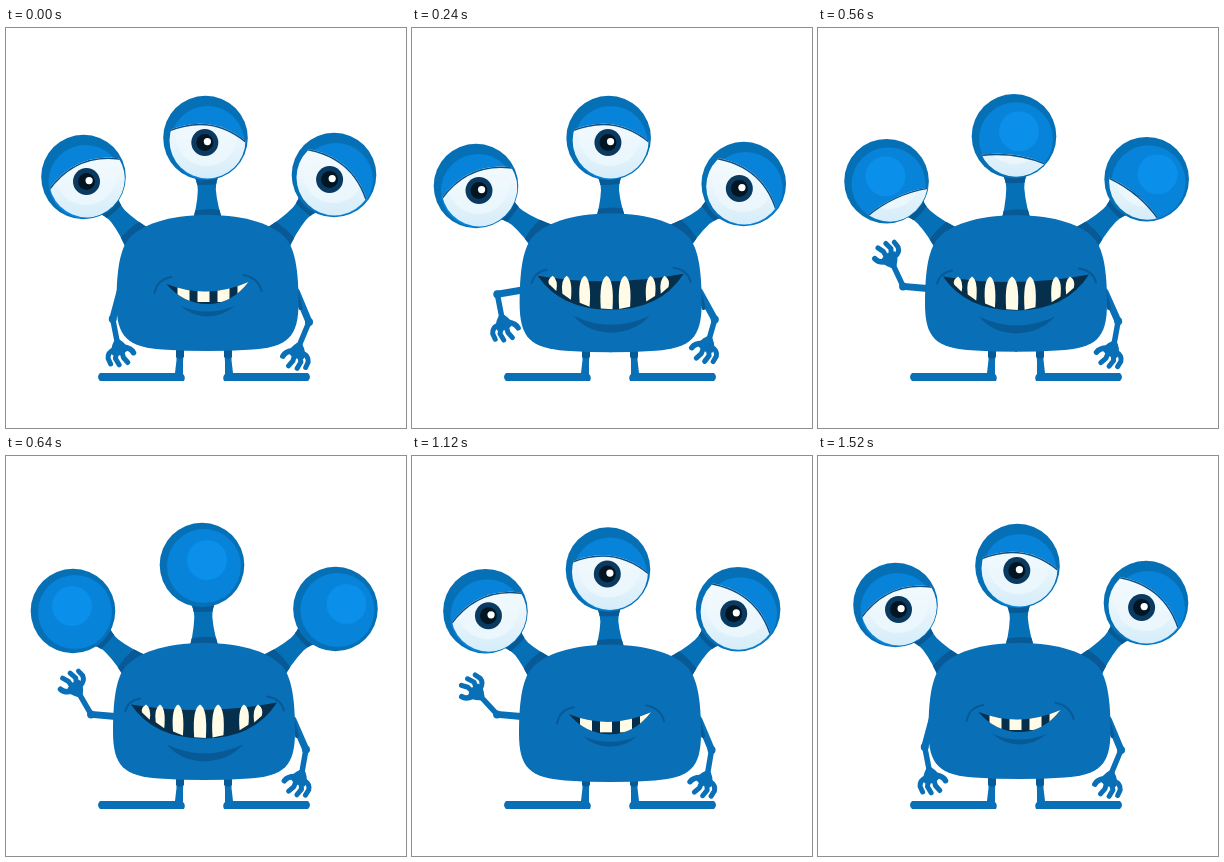
These frames come from a looping animation (400x400 px, 1600 ms). An HTML page with a canvas:

```html
<!DOCTYPE html>
<html lang="en">
<head>
<meta charset="utf-8">
<title>Waving monster</title>
<style>
html, body { margin: 0; width: 100%; height: 100%; overflow: hidden; background: #fff; }
canvas { display: block; width: 400px; height: 400px; }
</style>
</head>
<body>
<canvas id="stage"></canvas>
<script>
const LOOP = 1600, STEP = 80;
const C = {
  skin: '#096fb6', shade: '#085a97', ball: '#0670b6', lid: '#0783d9', shine: '#0a8fea',
  line: '#0a4f85', mouth: '#052f4b', tooth: '#fffbe6', iris: '#0a3a60', pupil: '#021523'
};

const canvas = document.getElementById('stage');
const g = canvas.getContext('2d');
const dpr = window.devicePixelRatio || 1;
canvas.width = canvas.height = 400 * dpr;

const rad = deg => deg * Math.PI / 180;
const polar = ([x, y], deg, len) => [x + len * Math.cos(rad(deg)), y + len * Math.sin(rad(deg))];
const mix = (a, b, u) => a + (b - a) * u;

function ease(t, from, to) {
  const u = Math.min(1, Math.max(0, (t - from) / (to - from)));
  return u * u * (3 - 2 * u);
}

// Eased walk through [time, value] points, starting at zero.
function track(t, points) {
  let from = 80, value = 0;
  for (const [to, next] of points) {
    value = mix(value, next, ease(t, from, to));
    from = to;
  }
  return value;
}

function poseAt(t) {
  const lift = ease(t, 80, 300) - ease(t, 1120, 1360);
  const raise = ease(t, 240, 400) - ease(t, 1070, 1360);
  const wave = 250 + 10 * Math.cos(2 * Math.PI * (t - 400) / 480);
  const droop = track(t, [[240, 1], [400, 0.33], [640, 0.78], [880, 0.33], [1120, 0.3], [1360, 0]]);
  const bob = track(t, [[240, 0], [400, -4], [640, -1], [880, -1.5], [1120, 3.5], [1360, 0]]);
  return {
    lift,
    fore: mix(79, wave, raise),
    recoil: 8 * lift * Math.exp((240 - t) / 200),
    shut: Math.max(0, 1 - Math.abs(t - 640) / 160),
    cx: 201.5 - 3.5 * lift,
    top: 187 + 3 * lift - 4 * droop,
    bottom: 323 + 1.5 * lift + 0.4 * bob,
    eyes: [
      [77.5 - 13.5 * droop, 149 + 9 * droop + bob],
      [199.5 - 3.5 * lift, 110 + bob],
      [328 - 4 * lift + 7 * droop, 147 + 9 * droop + bob]
    ]
  };
}

function fill(d, color) {
  g.fillStyle = color;
  g.fill(new Path2D(d));
}

function stroke(d, color, width) {
  g.strokeStyle = color;
  g.lineWidth = width;
  g.lineCap = g.lineJoin = 'round';
  g.stroke(new Path2D(d));
}

function disc(x, y, r, color) {
  g.fillStyle = color;
  g.beginPath();
  g.arc(x, y, r, 0, 2 * Math.PI);
  g.fill();
}

function at(x, y, deg, draw) {
  g.save();
  g.translate(x, y);
  g.rotate(rad(deg));
  draw();
  g.restore();
}

function hand([x, y], deg, flip) {
  at(x, y, deg, () => {
    g.scale(1, flip);
    fill('M-2 -3 Q4 -9 10 -8 Q15 0 11 8 Q4 9 -2 3Z', C.skin);
    stroke('M6 5 Q7 12 13 13 L19 12', C.skin, 5);
    stroke('M9 3 L15 6 L22 4 M9 -2 L16 -2 L22 -5', C.skin, 5);
    stroke('M6 -5 Q9 -12 14 -13', C.skin, 5.5);
  });
}

function arm(shoulder, elbow, wrist) {
  stroke(`M${shoulder} L${elbow}`, C.skin, 7);
  stroke(`M${elbow} L${wrist}`, C.skin, 5.5);
  disc(...elbow, 4, C.skin);
  disc(...wrist, 3.5, C.skin);
}

function leg(x, dir) {
  at(x, 0, 0, () => {
    g.scale(dir, 1);
    fill('M-4 318 H4 L3 334 V346 Q6 349 4 353 H-80 Q-84 349 -80 345 H-5 L-3.5 332Z', C.skin);
    fill('M-4 318 H4 V329 Q0 332 -4 329Z', C.shade);
  });
}

function stalk(bx, by, ex, ey) {
  const d = Math.hypot(ex - bx, ey - by);
  const neck = d - 38;
  at(bx, by, Math.atan2(ey - by, ex - bx) * 180 / Math.PI, () => {
    const shape = `M-10 -17 Q10 -10 ${neck - 14} -9 Q${neck - 5} -9 ${neck + 4} -14 V14 Q${neck - 5} 9 ${neck - 14} 9 Q10 10 -10 17Z`;
    fill(shape, C.ball);
    g.clip(new Path2D(shape));
    fill(`M${neck - 7} -20 Q${neck - 11} 0 ${neck - 7} 20 H${d} V-20Z`, C.shade);
    fill('M-10 -20 H5 Q11 0 5 20 H-10Z', C.shade);
  });
}

// side: -1 left, 0 middle, 1 right
function eye(x, y, side, shut) {
  const tilt = 7 + 32 * side;
  const wx = 2 - 1.5 * side, px = -0.7 - 3.7 * side;
  const ends = 2 + shut * 50, mid = -30 + shut * 80;
  const edge = `M-46 ${ends} Q2 ${mid} 46 ${ends}`;

  disc(x, y, 42.3, C.ball);
  at(x, y, 0, () => {
    g.beginPath();
    g.arc(0, 0, 41.5, 0, 2 * Math.PI);
    g.clip();
    disc(2, 5 - 4 * shut, 37, C.lid);
    if (shut > 0.3) disc(5 + 6 * side, -5, 20, C.shine);

    g.rotate(rad(tilt));
    g.clip(new Path2D(edge + ' V60 H-46Z'));
    g.rotate(rad(-tilt));
    const glow = g.createLinearGradient(0, -25, 0, 40);
    glow.addColorStop(0, '#f8fcff');
    glow.addColorStop(1, '#d6edf9');
    disc(wx, 2.5, 38, glow);
    disc(wx - 1, -3, 31, 'rgba(240,249,254,.7)');
    disc(px, 4.5, 13.5, C.iris);
    disc(px, 4.5, 8.5, C.pupil);
    disc(px + 2.6, 3.6, 3.6, '#fff');
    g.beginPath();
    g.arc(wx, 2.5, 38, 0, 2 * Math.PI);
    g.clip();
    g.rotate(rad(tilt));
    stroke(edge, C.line, 3);
  });
}

function body(x, top, bottom) {
  at(x, top, 0, () => {
    g.scale(1, (bottom - top) / 136);
    for (const dir of [1, -1]) {
      g.scale(dir, 1);
      fill('M-1 0 H0 C40 0 66 10 78 23 C89 35 91 62 91 88 C91 122 80 132 45 134.5 Q22 136 0 136 H-1Z', C.skin);
    }
  });
}

function smile(x, y) {
  at(x, y, 0, () => {
    g.save();
    g.clip(new Path2D('M-41 -9 Q0 7 41 -11 Q24 11 0 11 Q-24 11 -41 -9Z'));
    g.fillStyle = C.mouth;
    g.fillRect(-45, -15, 90, 30);
    g.fillStyle = C.tooth;
    for (let i = 0; i < 4; i++) g.fillRect(20 * i - 30, -12, 12, 21);
    g.restore();
    stroke('M-53 0 Q-50 -14 -36 -16', C.shade, 2);
    stroke('M36 -18 Q51 -15 54 -2', C.shade, 2);
    fill('M-27 13 Q0 24 27 13 Q16 23 0 23.5 Q-16 23 -27 13Z', C.shade);
  });
}

function grin(x, y) {
  at(x, y, 0, () => {
    const floor = v => 15.5 - v * v / 155;
    fill('M-73 -18 Q0 -6 73 -20 Q50 16 0 16 Q-50 16 -73 -18Z', C.mouth);
    for (const fx of [-58, -44, -26, -4, 14, 40, 54]) {
      const w = 7 - Math.abs(fx) / 25;
      fill(`M${fx - w + 1} ${floor(fx - w)} Q${fx - w - 1} -14 ${fx} -18 Q${fx + w + 1} -14 ${fx + w - 1} ${floor(fx + w)}Z`, C.tooth);
    }
    stroke('M-79 -11 Q-76 -22 -64 -24', C.shade, 2);
    stroke('M63 -26 Q77 -24 80 -12', C.shade, 2);
    fill('M-37 22 Q0 40 39 22 Q25 38 0 39 Q-24 38 -37 22Z', C.shade);
  });
}

function draw(t) {
  const { lift, fore, recoil, shut, cx, top, bottom, eyes } = poseAt(t);
  g.setTransform(dpr, 0, 0, dpr, 0, 0);
  g.fillStyle = '#fff';
  g.fillRect(0, 0, 400, 400);

  leg(174, 1);
  leg(222, -1);

  const ls = [cx - 87 + 4 * lift, 262 - lift];
  const le = polar(ls, 105 + 80 * lift, 30);
  const lw = polar(le, fore, 24);
  arm(ls, le, lw);
  hand(lw, fore - 4, 1);

  const rs = [cx + 89, 264];
  const re = [303 - 3.5 * lift + 0.4 * recoil, 294 - 0.4 * recoil];
  const rw = [293 + 2.5 * lift + 0.3 * recoil, 318 - recoil];
  arm(rs, re, rw);
  stroke(`M${rs} L${rs[0] + 4} 280`, C.shade, 4);
  hand(rw, 105 + 8 * lift, -1);

  eyes.forEach(([x, y], i) => {
    const side = i - 1;
    stalk(cx + 73 * side, top + 2 + 18 * Math.abs(side), x, y);
    eye(x, y, side, shut);
  });

  body(cx, top, bottom);
  const middle = (top + bottom) / 2;
  if (t >= 160 && t < 1120) grin(cx, middle + 11);
  else smile(cx, middle + 10);
}

const start = performance.now();
function tick() {
  const t = (performance.now() - start) % LOOP;
  draw(Math.floor(t / STEP) * STEP);
  requestAnimationFrame(tick);
}
tick();
</script>
</body>
</html>
```
